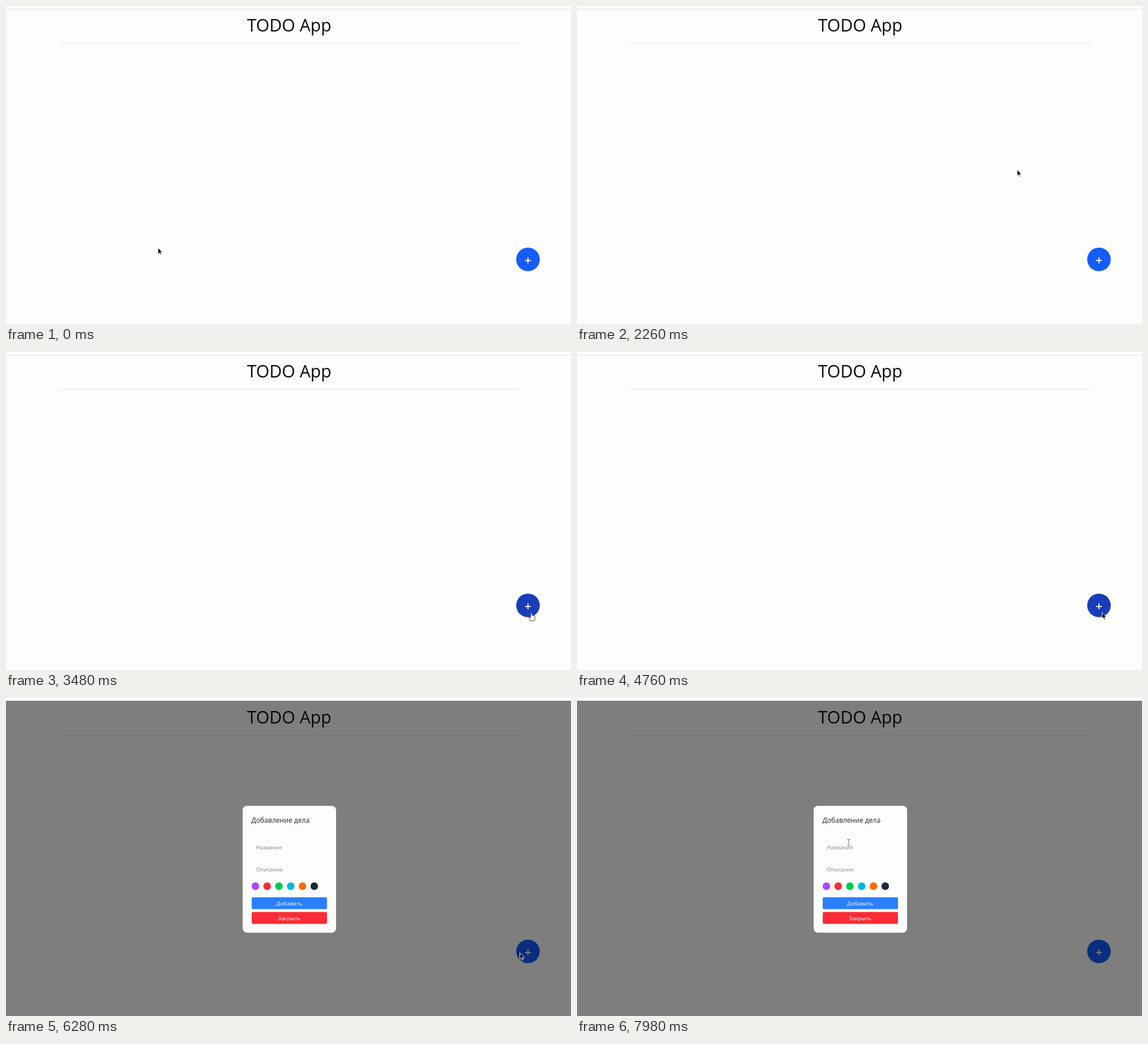
Recreate the animation shown at these times as an HTML page. Size 998 px wide and 561 px high, loop 8000 ms.

```html
<!DOCTYPE html>
<html lang="ru">
<head>
<meta charset="utf-8">
<title>TODO App</title>
<style>
  html, body { margin: 0; width: 100%; height: 100%; overflow: hidden; background: #fdfdfc; }
  svg { display: block; width: 998px; height: 561px; font-family: "Open Sans", "Noto Sans", sans-serif; }
  .mid { text-anchor: middle; }
  .field { font-size: 9.7px; fill: #858585; }
  .label { font-size: 9.8px; fill: #fff; text-anchor: middle; }
</style>
</head>
<body>
<svg viewBox="0 0 998 561">
  <rect width="998" height="561" fill="#fdfdfc"/>
  <path d="M0 5.5H998M95 66H907" stroke="#dfdfdc" stroke-width="1.2"/>
  <text class="mid" x="500.3" y="45" font-size="30.2" fill="#080808">TODO App</text>
  <circle id="add" cx="922" cy="447" r="20.8"/>
  <text class="mid" x="922" y="456.4" font-size="21" font-weight="600" fill="#fff">+</text>

  <g id="dialog">
    <rect y="5" width="998" height="556" fill="#000" opacity=".5"/>
    <rect x="418" y="190.3" width="165" height="223.7" rx="7.5" fill="#fdfdfd"/>
    <text x="433.5" y="220.3" font-size="12.1" fill="#222">Добавление дела</text>
    <text class="field" x="441.5" y="267.3">Название</text>
    <text class="field" x="441.5" y="306.2">Описание</text>
    <g id="swatches"></g>
    <rect x="434" y="351.5" width="133" height="21" rx="2.5" fill="#2b7fff"/>
    <text class="label" x="500.3" y="366">Добавить</text>
    <rect x="434" y="377.4" width="133" height="21" rx="2.5" fill="#fb2c36"/>
    <text class="label" x="500.3" y="391.8">Закрыть</text>
  </g>

  <g id="pointer">
    <path id="arrow" d="M0 0V11.2L2.6 8.9 4.3 12.8 6 12 4.3 8.3H7.8Z" fill="#000" stroke="#fff" stroke-width=".9"/>
    <path id="hand" d="M-1.2 1Q0-.6 1.2 1V5Q2.3 4.2 3.2 5.3 4.3 4.6 5 5.8 6.3 5.3 6.6 6.8V10.5L5.2 14.6H-1.4L-4.4 9.6Q-5.2 7.8-3.6 7.7L-1.2 9.6Z" fill="#fff" stroke="#111" stroke-width=".8"/>
    <path id="beam" d="M-3-5.6H-.8L0-5 .8-5.6H3M0-5V5M-3 5.6H-.8L0 5 .8 5.6H3" fill="none" stroke="#666" stroke-width=".9"/>
  </g>
</svg>
<script>
const LOOP = 8000, CLICK = 4760, OPEN = 4780;
const $ = id => document.getElementById(id);
const show = (el, on) => el.setAttribute('visibility', on ? 'visible' : 'hidden');

const colors = ['#ad46ff', '#fb2c36', '#00c950', '#00b8db', '#ff6900', '#1e2939'];
$('swatches').innerHTML = colors.map((c, i) =>
  `<circle cx="${440.5 + i * 20.8}" cy="332" r="6.7" fill="${c}"/>`).join('');

const hold = () => 0;
const out = p => Math.sin(p * Math.PI / 2);
const inOut = p => p * p * (3 - 2 * p);
const linear = p => p;

// time, x, y, easing towards the next stop
const stops = [
  [0, 268.5, 426.5, hold],
  [2240, 769, 278, out],
  [2780, 907.5, 452.5, linear],
  [2960, 919, 457, hold],
  [3060, 919, 457, inOut],
  [3300, 932, 461, inOut],
  [3520, 927.5, 459.5, hold],
  [6280, 908.5, 450, out],
  [7020, 517, 272, hold],
  [7120, 517, 272, inOut],
  [7240, 521, 272, inOut],
  [7700, 480, 254.5, hold],
  [7980, 480, 255, hold],
  [LOOP, 480, 255, hold]
];

function position(t) {
  const i = stops.findIndex((s, n) => t < stops[n + 1][0]);
  const [t0, x0, y0, ease] = stops[i], [t1, x1, y1] = stops[i + 1];
  const p = ease((t - t0) / (t1 - t0));
  return [x0 + (x1 - x0) * p, y0 + (y1 - y0) * p];
}

function draw(t) {
  const [x, y] = position(t);
  const open = t >= OPEN;
  const hover = !open && Math.hypot(x - 922, y - 447) < 21;
  const inField = open && x > 434 && x < 567 &&
    (y > 248 && y < 279 || y > 287 && y < 318);
  const visible = t < 1260 || t >= 2240;
  const kind = inField ? 'beam' : hover && t < CLICK ? 'hand' : 'arrow';

  $('add').setAttribute('fill', hover ? '#193cb8' : '#155dfc');
  show($('dialog'), open);
  $('pointer').setAttribute('transform', `translate(${x} ${y})`);
  for (const id of ['arrow', 'hand', 'beam']) show($(id), visible && id === kind);
}

function tick() {
  draw(performance.now() % LOOP);
  requestAnimationFrame(tick);
}
tick();
</script>
</body>
</html>
```
